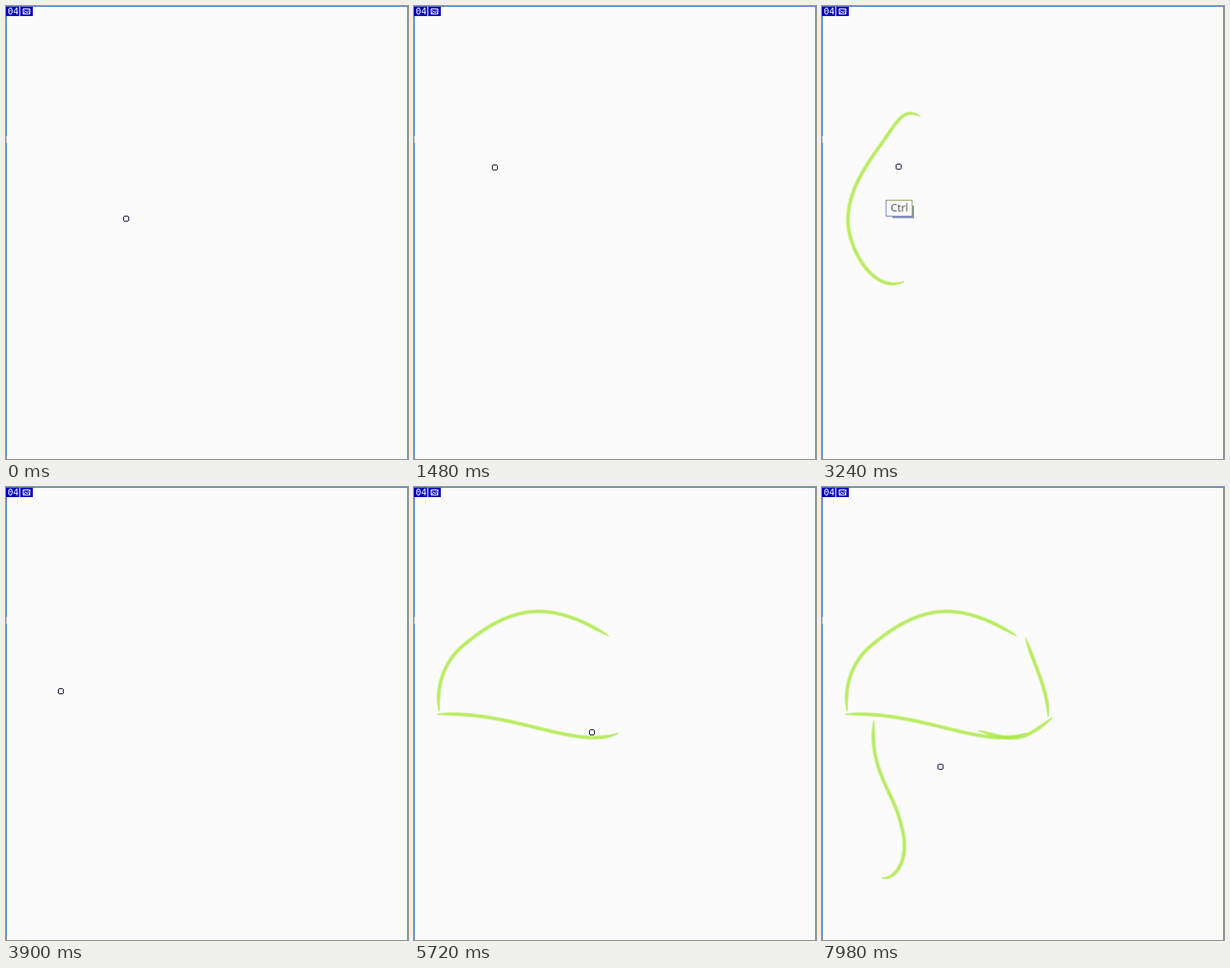
Recreate the animation shown at these times as an HTML page with a canvas. Size 480x540 px, loop 8 s.

```html
<!DOCTYPE html>
<html lang="en">
<head>
<meta charset="utf-8">
<title>Sketching strokes</title>
<style>
  html, body { margin: 0; width: 100%; height: 100%; overflow: hidden; background: #fbfbfb; }
  canvas { display: block; width: 100%; height: 100%; }
</style>
</head>
<body>
<canvas width="480" height="540"></canvas>
<script>
const LOOP = 8000;
const UNDO = 3420;
const ctx = document.querySelector('canvas').getContext('2d');

// The pen's journey: each leg carries on from where and when the last one ended.
const legs = [];
let pen = [143, 253], clock = 0;

function addLeg(end, curve, ink) {
  const path = document.createElementNS('http://www.w3.org/2000/svg', 'path');
  path.setAttribute('d', `M${pen}${curve}`);
  const points = [];
  for (let s = 0; s <= path.getTotalLength(); s++) {
    const { x, y } = path.getPointAtLength(s);
    points.push([x, y]);
  }
  legs.push({ start: clock, end, points, ink });
  pen = points.at(-1).map(Math.round);
  clock = end;
}
const hover = (end, curve) => addLeg(end, curve, false);
const draw = (end, curve) => addLeg(end, curve, true);

// Tall curve, undone later
hover(1480, 'C250 290 270 230 95 192');
hover(1680, 'Q100 155 118 131');
draw(2270, 'C96 119 90 139 66 171C48 197 31 223 31 257C32 290 62 345 99 328');
hover(3240, 'C100 280 20 245 92 191');
hover(4440, 'Q80 245 30 268');
// Dome
draw(4900, 'C25 225 45 200 60 188C120 138 165 136 233 178');
hover(5160, 'C300 190 120 260 26 271');
// Lower edge
draw(5600, 'C120 266 195 315 245 293');
hover(5810, 'C258 288 235 296 185 290');
draw(6140, 'C230 304 240 304 276 274');
hover(6540, 'C285 250 230 130 243 180');
// Right side
draw(6720, 'C253 212 271 243 270 275');
hover(7250, 'Q110 235 62 278');
// Hanging curl
draw(7760, 'C56 340 85 360 95 405C107 445 85 472 70 465');
hover(7980, 'Q150 430 141 332');

function reached(leg, t) {
  const u = Math.max(0, Math.min(1, (t - leg.start) / (leg.end - leg.start)));
  return Math.round(u * u * (3 - 2 * u) * (leg.points.length - 1));
}

function ribbon(points, halfWidth) {
  const last = points.length - 1;
  const left = [], right = [];
  points.forEach(([x, y], i) => {
    const a = points[Math.max(0, i - 1)], b = points[Math.min(last, i + 1)];
    const dx = b[0] - a[0], dy = b[1] - a[1];
    const w = halfWidth * Math.sqrt(Math.min(1, i / 18, (last - i) / 18)) / Math.hypot(dx, dy);
    left.push([x - dy * w, y + dx * w]);
    right.unshift([x + dy * w, y - dx * w]);
  });
  ctx.beginPath();
  left.concat(right).forEach(p => ctx.lineTo(...p));
  ctx.fill();
}

function drawStroke(points) {
  ctx.fillStyle = 'rgba(168, 230, 60, .42)';
  for (const halfWidth of [2.5, 1.8, 1.1]) ribbon(points, halfWidth);
}

function box(color, x, y, w, h) {
  ctx.fillStyle = color;
  ctx.fillRect(x, y, w, h);
}

function label(text, x, y, font, color) {
  ctx.font = font;
  ctx.fillStyle = color;
  ctx.fillText(text, x, y);
}

function drawStage() {
  box('#fbfbfb', 0, 0, 480, 540);
  box('#4f7fc9', 0, 0, 480, 1);
  box('#4f7fc9', 0, 0, 1, 540);
  box('#6283bd', 479, 0, 1, 540);
  box('#b9c9a4', 0, 155, 1, 8);
  box('#0000b8', 0, 1, 16, 11);
  box('#0000b8', 17, 1, 15, 11);
  label('04', 2, 10, '11px "DejaVu Sans Mono", monospace', '#fff');
  ctx.strokeStyle = '#fff';
  ctx.lineWidth = 1;
  ctx.strokeRect(20.5, 3.5, 8, 6);
  ctx.stroke(new Path2D('M21 9L23.5 6L25 8L26.5 6.5L28.5 9M22 5.5h1M26 5.5h1'));
}

function drawKeyHint() {
  box('#8e99b4', 84, 238, 26, 15);
  box('#fdfdfd', 76, 231, 32, 20);
  box('#7288c4', 76, 231, 1, 20);
  box('#7288c4', 76, 250, 32, 1);
  box('#8da663', 76, 231, 32, 1);
  box('#8da663', 107, 231, 1, 20);
  label('Ctrl', 82, 245, '12.5px "Noto Sans", sans-serif', '#555b58');
}

function drawPen([px, py]) {
  const x = Math.round(px), y = Math.round(py), ink = '#101040';
  box(ink, x - 2, y - 3, 5, 7);
  box(ink, x - 3, y - 2, 7, 5);
  box('#fffff4', x - 2, y - 2, 5, 5);
}

function render(t) {
  drawStage();
  for (const leg of legs) {
    const undone = leg.end < UNDO && t >= UNDO;
    const count = reached(leg, t) + 1;
    if (leg.ink && !undone && count > 2) drawStroke(leg.points.slice(0, count));
  }
  if (t >= 3000 && t < UNDO + 100) drawKeyHint();
  const current = legs.findLast(leg => leg.start <= t);
  drawPen(current.points[reached(current, t)]);
}

const began = performance.now();
function tick() {
  render((performance.now() - began) % LOOP);
  requestAnimationFrame(tick);
}
tick();
</script>
</body>
</html>
```
